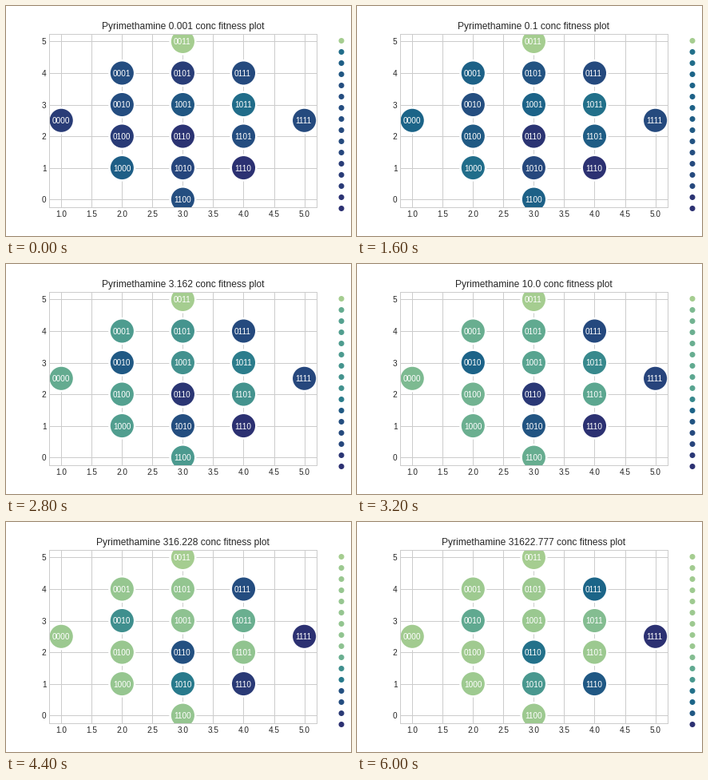
Recreate the animation shown at these times as a matplotlib script. Size 432 by 288 pixels, loop 6400 ms.

```python
import matplotlib.pyplot as plt
import numpy as np
from matplotlib.animation import FuncAnimation
from matplotlib.colors import LinearSegmentedColormap

DPI = 72
FRAMES, INTERVAL = 16, 400
INK, GRID = "0.15", "0.8"
SLOPE = -0.6824968

plt.rcParams.update({
    "font.family": "Liberation Sans",
    "font.size": 10,
    "text.color": INK,
    "xtick.color": INK,
    "ytick.color": INK,
    "axes.edgecolor": GRID,
    "axes.linewidth": 1,
    "grid.color": GRID,
    "grid.linewidth": 1,
    "axes.axisbelow": True,
    "xtick.major.size": 0,
    "ytick.major.size": 0,
})

CREST = LinearSegmentedColormap.from_list("crest", [
    "#a5cd90", "#7dba91", "#59a590", "#40908e",
    "#287a8c", "#1c6488", "#254b7f", "#2c3172"])

# Genotype: (row, growth without drug, log10 IC50 in mol/l)
GENOTYPES = {
    "0000": (2.5, 0.955, -6.286),
    "0001": (4, 0.850, -5.812),
    "0010": (3, 0.845, -4.239),
    "0011": (5, 0.000, -6.000),
    "0100": (2, 0.955, -6.046),
    "0101": (4, 0.940, -5.774),
    "0110": (2, 0.985, -3.732),
    "0111": (4, 0.860, -3.550),
    "1000": (1, 0.755, -5.724),
    "1001": (3, 0.790, -5.491),
    "1010": (1, 0.880, -4.015),
    "1011": (3, 0.655, -4.600),
    "1100": (0, 0.845, -5.773),
    "1101": (2, 0.850, -5.624),
    "1110": (1, 1.000, -3.587),
    "1111": (2.5, 0.860, -3.300),
}
rows, growth, ic50 = np.array(list(GENOTYPES.values())).T
cols = np.array([name.count("1") + 1 for name in GENOTYPES])


def fitness(log_conc):
    """Dose response at a log10 concentration in micromol/l, scaled to 0..1."""
    f = growth / (1 + np.exp((ic50 - (log_conc - 6)) / SLOPE))
    return (f - f.min()) / (f.max() - f.min())


fig = plt.figure(figsize=(432 / DPI, 288 / DPI), dpi=DPI, facecolor="white")
ax = fig.add_axes([0.125, 0.125, 0.775, 0.755])
ax.set_xlim(0.8, 5.2)
ax.set_ylim(-0.25, 5.25)
ax.set_xticks(np.arange(1, 5.1, 0.5))
ax.set_yticks(range(6))
ax.grid(True)
title = ax.set_title("", fontsize=12)

nodes = ax.scatter(cols, rows, s=1000, edgecolors="white",
                   linewidths=0.08 * np.sqrt(1000))
for name, x, y in zip(GENOTYPES, cols, rows):
    ax.text(x - 0.15, y - 0.1, name, color="white")

# Legend markers in pixel coordinates over the whole stage
stage = fig.add_axes([0, 0, 1, 1])
stage.set(xlim=(0, 432), ylim=(288, 0))
stage.axis("off")
keys = stage.scatter(np.full(16, 420), 43.5 + 14 * np.arange(16),
                     s=49, linewidths=0)


def draw(frame):
    log_conc = frame / 2 - 3
    values = fitness(log_conc)
    title.set_text(f"Pyrimethamine {round(10 ** log_conc, 3)} conc fitness plot")
    nodes.set_facecolor(CREST(values))
    keys.set_facecolor(CREST(np.sort(values)))
    return nodes, keys, title


anim = FuncAnimation(fig, draw, frames=FRAMES, interval=INTERVAL,
                     repeat=True, repeat_delay=0)
plt.show()
```
